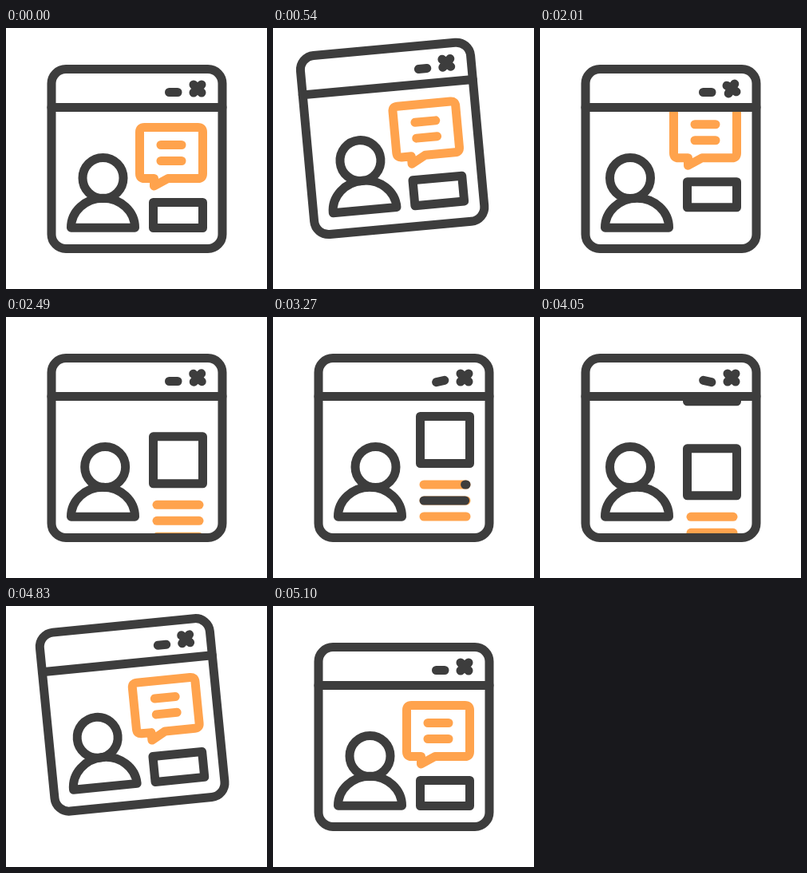
An HTML page for the animation above (5.4 s loop, 327 px wide and 327 px high).

```html
<!DOCTYPE html>
<html lang="en">
<head>
<meta charset="utf-8">
<title>Chat window</title>
<style>
  html, body { margin: 0; width: 100%; height: 100%; overflow: hidden; background: #fff; }
  svg { display: block; width: 100vw; height: 100vh; }
  g { fill: none; stroke: #3d3d3d; stroke-width: 11; stroke-linecap: round; stroke-linejoin: round; }
  .accent { stroke: #ffa34d; }
</style>
</head>
<body>
<svg viewBox="0 0 327 327">
  <clipPath id="page"><rect x="57" y="99" width="214" height="177"/></clipPath>
  <g id="window">
    <g clip-path="url(#page)">
      <g id="strip">
        <path class="accent" d="M173.500 124.500H240.500Q246.500 124.500 246.500 130.500V182.500Q246.500 188.500 240.500 188.500H203L185.500 198V188.500H173.500Q167.500 188.500 167.500 182.500V130.500Q167.500 124.500 173.500 124.500Z"/>
        <rect x="184.500" y="218.500" width="62" height="32"/>
        <rect x="184.500" y="309.500" width="62" height="59"/>
      </g>
    </g>
    <rect x="57" y="51.500" width="214" height="225" rx="18"/>
    <path d="M57 99.500H271"/>
    <path id="dash" d="M204.500 80.500H215"/>
    <path id="cross" d="M235 71L245 81M245 71L235 81"/>
    <circle id="head" cy="188" r="25.500"/>
    <path d="M81.500 250.200A40 37 0 0 1 161.500 250.200Z"/>
  </g>
</svg>
<script>
const LOOP = 5400;
const part = id => document.getElementById(id);
const move = (id, transform) => part(id).setAttribute('transform', transform);

// Eased value at time t along alternating [time, value] keys.
function track(t, ...keys) {
  if (t <= keys[0]) return keys[1];
  for (let i = 2; i < keys.length; i += 2) {
    if (t < keys[i]) {
      const u = (t - keys[i - 2]) / (keys[i] - keys[i - 2]);
      return keys[i - 1] + (keys[i + 1] - keys[i - 1]) * u * u * (3 - 2 * u);
    }
  }
  return keys[keys.length - 1];
}

function addPath(className) {
  const path = document.createElementNS('http://www.w3.org/2000/svg', 'path');
  path.setAttribute('class', className);
  part('strip').append(path);
  return path;
}

// A text line with a dark stroke that sweeps across it from its start time.
function textLine(x1, x2, y, start) {
  addPath('accent').setAttribute('d', `M${x1} ${y}H${x2}`);
  const sweep = addPath('');
  return t => {
    const at = from => x1 + (x2 - x1) * track(t, from, 0, from + 300, 1);
    const visible = t > start && t < start + 600;
    sweep.setAttribute('d', visible ? `M${at(start + 300)} ${y}H${at(start) + 0.01}` : '');
  };
}

const lines = [
  textLine(194, 220, 146.5, 900),
  textLine(194, 220, 166.5, 1200),
  textLine(189, 242, 395, 2700),
  textLine(189, 242, 415, 3000),
  textLine(189, 242, 435, 3300)
];

function draw(now) {
  const t = now % LOOP;
  const hop = track(t, 300, 0, 600, 1, 900, 0);
  const hopBack = track(t, 4500, 0, 4800, 1, 5100, 0);
  const lift = hop + hopBack;
  move('window', `translate(${-16 * hop - 6 * hopBack} ${-28.5 * lift}) rotate(${-5.8 * lift} 164 164)`);
  move('strip', `translate(0 ${-track(t, 1800, 0, 2700, 185, 3840, 185, 4540, 0)})`);
  move('cross', `rotate(${track(t, 1200, 0, 1600, 25, 2040, -13, 2700, 0)} 240 76)`);
  move('dash', `rotate(${track(t, 3000, 0, 3450, -20, 4050, 13, 4800, 0)} 209.75 80.5)`);
  part('head').setAttribute('cx', track(t, 1500, 121.5, 2010, 113, 2100, 113, 2700, 128.5,
    3300, 128.5, 3930, 113, 4500, 113, 5100, 121.5));
  lines.forEach(update => update(t));
}

const began = performance.now();
function frame() {
  draw(performance.now() - began);
  requestAnimationFrame(frame);
}
frame();
</script>
</body>
</html>
```
